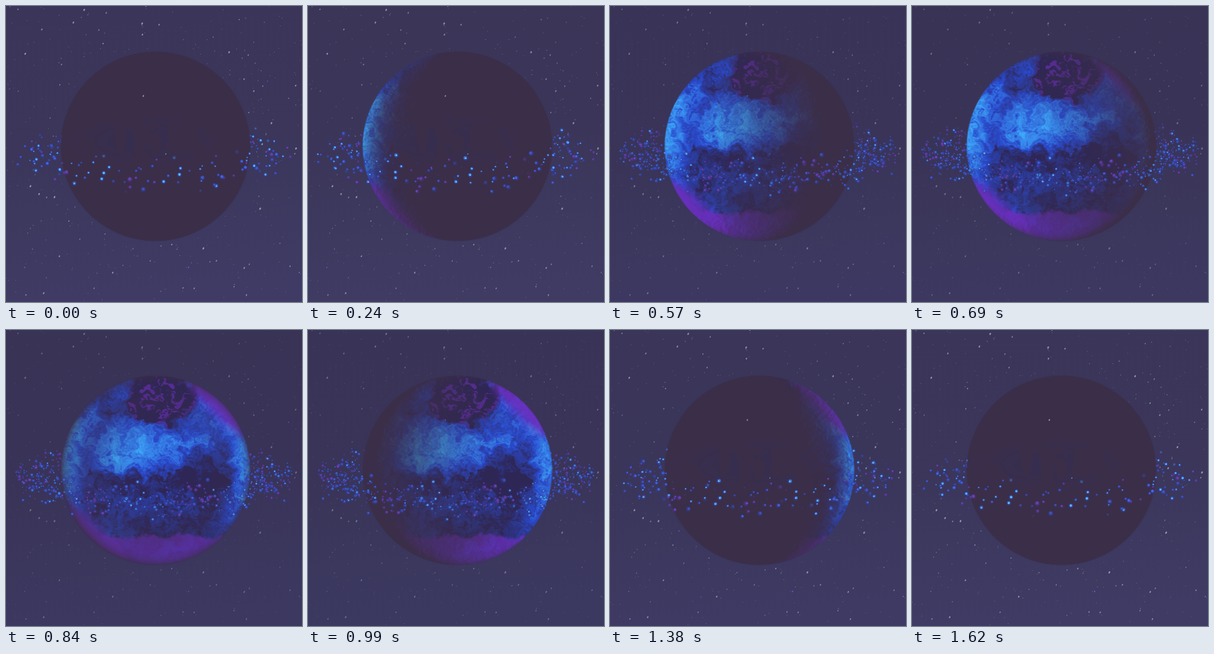
Write an HTML page with a canvas that moves like this. It is 500 px wide and 500 px high and loops after 1.65 s.

```html
<!DOCTYPE html>
<html lang="en">
<head>
<meta charset="utf-8">
<title>Planet with asteroid belt</title>
<style>
  html, body { margin: 0; width: 100%; height: 100%; overflow: hidden; background: #3b3559; }
  canvas { display: block; width: 500px; height: 500px; }
</style>
</head>
<body>
<canvas id="stage" width="500" height="500"></canvas>
<script>
const LOOP = 1650, STEP = 30, NOON = 815, TAU = Math.PI * 2;
const CX = 252.5, CY = 237, R = 160;
const ctx = document.getElementById('stage').getContext('2d');

const clamp = (v, lo = 0, hi = 1) => Math.min(hi, Math.max(lo, v));
const mix = (a, b, k) => a + (b - a) * k;
const smooth = (a, b, v) => { const k = clamp((v - a) / (b - a)); return k * k * (3 - 2 * k); };
const bell = (x, y, w, h) => Math.exp(-((x / w) ** 2) - (y / h) ** 2);

function seeded(s) {
  return () => {
    s = (s + 0x6D2B79F5) | 0;
    let n = Math.imul(s ^ (s >>> 15), 1 | s);
    n = (n + Math.imul(n ^ (n >>> 7), 61 | n)) ^ n;
    return ((n ^ (n >>> 14)) >>> 0) / 4294967296;
  };
}

function layer(size) {
  const c = document.createElement('canvas');
  c.width = c.height = size;
  return c;
}

// ---- Noise ----
function hash(x, y) {
  let h = Math.imul(x, 374761393) + Math.imul(y, 668265263);
  h = Math.imul(h ^ (h >>> 13), 1274126177);
  return ((h ^ (h >>> 16)) >>> 0) / 4294967296;
}
function noise(x, y) {
  const i = Math.floor(x), j = Math.floor(y);
  const u = smooth(0, 1, x - i), v = smooth(0, 1, y - j);
  return mix(mix(hash(i, j), hash(i + 1, j), u), mix(hash(i, j + 1), hash(i + 1, j + 1), u), v);
}
function fbm(x, y, octaves) {
  let sum = 0, amp = 0.5, total = 0;
  for (let o = 0; o < octaves; o++) {
    sum += amp * noise(x, y);
    total += amp;
    x = x * 2.03 + 17; y = y * 2.03 + 31; amp *= 0.5;
  }
  return sum / total;
}

// ---- Planet ----
const SIZE = 324, HALF = SIZE / 2;
const planet = layer(SIZE), pctx = planet.getContext('2d');
const image = pctx.createImageData(SIZE, SIZE);
const cells = [];

function height(x, y) {
  const w = noise(x / 13, y / 13) * 2;
  return fbm(x / 6 + w, y / 5 - w, 2);
}

// Brightness and violet share at a point measured from the centre
function surface(x, y, rim) {
  const wx = x + (fbm(x / 18, y / 18, 4) - .5) * 44;
  const wy = y + (fbm(x / 18 + 50, y / 18 + 9, 4) - .5) * 52;
  const ridge = 1 - Math.abs(2 * fbm(wx / 8, wy / 8, 2) - 1);
  const cap = smooth(1.15, .8, Math.hypot((wx - 8) / 58, (wy + 122) / 42));
  const belt = smooth(-2, 10, wy) * smooth(52, 32, wy) * smooth(135, 105, Math.abs(wx));
  const south = smooth(35, 60, wy);
  const polar = smooth(108, 116, y + (wy - y) * .5);
  const sides = rim * smooth(.95, .3, Math.abs(y) / R);

  const v = .36 + (fbm(wx / 26, wy / 22, 4) - .5) * .55 + (ridge - .75) * .4
    + .5 * bell(wx + 50, wy + 32, 62, 42) + .2 * bell(wx - 55, wy + 52, 60, 38) + .36 * sides
    - .6 * cap - .36 * belt - .2 * south - .45 * bell(wx + 82, wy + 100, 18, 15)
    - .35 * bell(wx - 78, wy - 12, 34, 32);
  const edge = rim * smooth(.26, .42, -x * y / (R * R));
  const specks = cap * smooth(.56, .68, fbm(wx / 9, wy / 5, 2));
  return [clamp(v), clamp(edge + specks * .8 + polar * .8) * .9];
}

function buildPlanet() {
  for (let j = 0; j < SIZE; j++) for (let i = 0; i < SIZE; i++) {
    const x = i + .5 - HALF, y = j + .5 - HALF, d = Math.hypot(x, y) / R;
    const alpha = clamp((1 - d) * R / 1.8 + .5);
    if (!alpha) continue;
    const rim = smooth(.72, .97, d);
    const [v, m] = surface(x, y, rim);
    const h = height(x, y);
    const lo = clamp(v * 2), hi = clamp(v * 2 - 1);
    cells.push({
      p: (j * SIZE + i) * 4, alpha: alpha * 255, rim,
      nx: x / R + (h - height(x + 1, y)) * .9,
      ny: y / R + (h - height(x, y + 1)) * .9,
      nz: Math.sqrt(Math.max(0, 1 - d * d)),
      ghost: .45 * bell(x + 18, y + 9, 105, 36) * smooth(.35, .6, fbm(x / 15, y / 24, 2)),
      r: mix(mix(mix(46, 42, lo), 64, hi), 108, m),
      g: mix(mix(mix(38, 74, lo), 180, hi), 46, m),
      b: mix(mix(mix(85, 205, lo), 255, hi), 190, m)
    });
  }
}

function shadePlanet(a, lit) {
  const lx = Math.sin(a), lz = Math.cos(a), wrap = .14 * lit;
  const px = image.data;
  for (const c of cells) {
    const dot = clamp((c.nx * lx - c.ny * .04 + c.nz * lz + wrap) / (1 + wrap));
    const k = Math.min(1, dot ** 1.35 * (1.05 + 1.1 * c.rim * lit));
    px[c.p] = mix(mix(59, 48, c.ghost), c.r, k);
    px[c.p + 1] = mix(mix(46, 47, c.ghost), c.g, k);
    px[c.p + 2] = mix(mix(72, 90, c.ghost), c.b, k);
    px[c.p + 3] = c.alpha;
  }
  pctx.putImageData(image, 0, 0);
}

// ---- Sky ----
const sky = layer(500), starLayer = layer(500);

function star(c, x, y, r, color) {
  c.fillStyle = color;
  c.beginPath();
  c.ellipse(x, y, r * .8, r * 1.25, .5, 0, TAU);
  c.fill();
}

function buildSky() {
  const c = sky.getContext('2d');
  const g = c.createLinearGradient(0, 0, 40, 500);
  g.addColorStop(0, '#3b3559');
  g.addColorStop(.5, '#3b365a');
  g.addColorStop(1, '#3f3b64');
  c.fillStyle = g;
  c.fillRect(0, 0, 500, 500);

  const s = starLayer.getContext('2d'), rnd = seeded(41);
  for (let n = 0; n < 460; n++) {
    const x = rnd() * 500, y = rnd() * 500, size = rnd() ** 5, blue = rnd();
    if (Math.hypot(x - CX, y - CY) < R + 3) continue;
    const sat = blue > .96 ? 55 : 12;
    star(s, x, y, .55 + size * 1.1, `hsl(${mix(215, 260, rnd())} ${sat}% ${50 + size * 14}%)`);
  }
}

// ---- Belt: one sector repeated, turned by one sector per loop ----
const SECTORS = 10, PER = 80, GLOWING = .27;
const rocks = [];

function buildBelt() {
  const rnd = seeded(9);
  for (let n = 0; n < PER; n++) {
    const rock = {
      at: rnd() * TAU / SECTORS, rad: 166 + 70 * rnd(), lift: (rnd() + rnd() - 1) * 33,
      size: 1 + rnd() ** 2 * 2, rank: rnd(), tone: rnd(), glow: .5 + rnd() * .5
    };
    for (let s = 0; s < SECTORS; s++) rocks.push({ ...rock, at: rock.at + s * TAU / SECTORS });
  }
}

function dot(x, y, r, color, alpha) {
  ctx.globalAlpha = alpha;
  ctx.fillStyle = color;
  ctx.beginPath();
  ctx.arc(x, y, r, 0, TAU);
  ctx.fill();
}

function drawBelt(u, a, lit, front) {
  const share = GLOWING + (1 - GLOWING) * smooth(.03, .9, lit);
  for (const k of rocks) {
    const th = k.at + u * TAU / SECTORS, depth = Math.sin(th);
    const show = clamp((share - k.rank) * 9);
    if ((depth > 0) !== front || !show) continue;
    const x = 250 + k.rad * Math.cos(th);
    const y = 250 + k.rad * .19 * depth + k.lift * (.9 + .1 * depth);
    const glowing = k.rank < GLOWING;
    const size = k.size * (1 + .2 * depth) + (glowing ? .9 * (1 - lit) : 0);
    // slow wave of cyan and violet groups along the belt
    const wave = Math.cos(7 * th - u * TAU + 4.05) + (k.tone - .5) * 2.2;
    const cool = wave > .6, violet = wave < -.6;
    const core = cool ? '#429ff6' : violet ? '#7a48cc' : '#4468ea';
    const own = glowing ? 1 - .25 * lit : .25 + .65 * lit;
    dot(x, y, size + .4, violet ? '#4b3488' : '#333c98', show * .55);
    dot(x + size * .3 * Math.sin(a), y - size * .15, size * .62, core, show * own * k.glow);
    if (cool && glowing) dot(x, y, size * .38, '#78ccff', show * .7);
  }
  ctx.globalAlpha = 1;
}

function draw(t) {
  const u = t / LOOP, a = (t - NOON) / LOOP * TAU;
  const lit = .5 + .5 * Math.cos(a);
  ctx.drawImage(sky, 0, 0);
  ctx.fillStyle = `rgba(44,38,66,${.12 * lit})`;
  ctx.fillRect(0, 0, 500, 500);
  ctx.globalAlpha = 1 - .45 * lit;
  ctx.drawImage(starLayer, 0, 0);
  ctx.globalAlpha = 1;
  drawBelt(u, a, lit, false);
  shadePlanet(a, lit);
  ctx.drawImage(planet, CX - HALF, CY - HALF);
  ctx.globalAlpha = 1 - .8 * lit;
  star(ctx, 232, 152, 1.3, '#9c9cb0');
  star(ctx, 270, 250, 1.1, '#85859c');
  drawBelt(u, a, lit, true);
}

buildPlanet();
buildSky();
buildBelt();

const start = performance.now();
let last = -1;
function tick() {
  const t = Math.floor(((performance.now() - start) % LOOP) / STEP) * STEP;
  if (t !== last) draw(last = t);
  requestAnimationFrame(tick);
}
tick();
</script>
</body>
</html>
```
